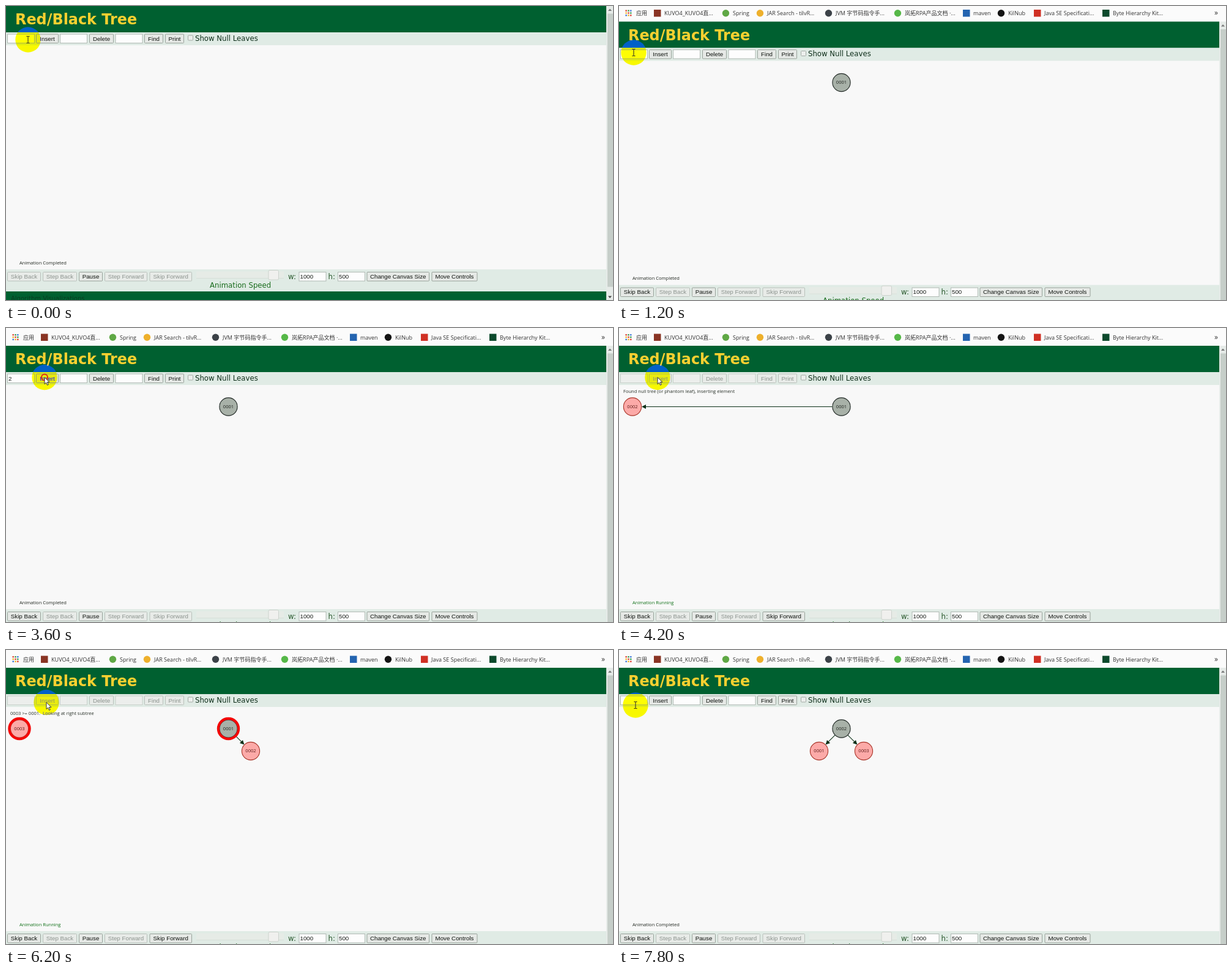
An HTML page for the animation above (8 s loop, 992 by 480 pixels).

```html
<!DOCTYPE html>
<html lang="en">
<head>
<meta charset="utf-8">
<title>Red/Black Tree</title>
<style>
html, body { margin: 0; width: 100%; height: 100%; overflow: hidden; background: #f8f8f8; }
svg { display: block; width: 992px; height: 480px; isolation: isolate; }
text { white-space: pre; }
.page { font-family: "DejaVu Sans", sans-serif; font-size: 11.72px; }
.form { font-family: "Liberation Sans", sans-serif; font-size: 9.76px; }
.note { font-family: "Open Sans", sans-serif; font-size: 7.55px; }
.mark { font-family: "Open Sans", "Noto Sans CJK SC", "Noto Sans CJK", sans-serif; font-size: 9.05px; }
.glow { mix-blend-mode: difference; }
</style>
</head>
<body>
<svg id="stage" viewBox="0 0 992 480"></svg>
<script>
const LOOP = 8000, STEP = 200;
const stage = document.getElementById('stage');

// Last value whose start time has passed
const at = (keys, t) => keys.reduce((v, k) => (t >= k[0] ? k[1] : v), '');
const within = (spans, t) => spans.some(([a, b]) => t >= a && t < b);

// Linear path through [time, x, y] points
function along(keys, t) {
  const i = keys.findIndex(k => k[0] > t);
  if (i < 0) return keys[keys.length - 1].slice(1);
  if (i === 0) return keys[0].slice(1);
  const [a, b] = [keys[i - 1], keys[i]], u = (t - a[0]) / (b[0] - a[0]);
  return [1, 2].map(n => a[n] + (b[n] - a[n]) * u);
}

const rect = (x, y, w, h, fill, more = '') =>
  `<rect x="${x}" y="${y}" width="${w}" height="${h}" fill="${fill}" ${more}/>`;
const disc = (x, y, r, fill, more = '') =>
  `<circle cx="${x}" cy="${y}" r="${r}" fill="${fill}" ${more}/>`;
const path = (d, fill, more = '') => `<path d="${d}" fill="${fill}" ${more}/>`;
const label = (x, y, str, cls, fill, more = '') =>
  `<text x="${x}" y="${y}" class="${cls}" fill="${fill}" ${more}>` +
  `${str.replace(/</g, '&lt;').replace(/>/g, '&gt;')}</text>`;

function button(x, x2, y, str, on = true) {
  return rect(x + .5, y + .5, x2 - x - 1, 14.5, on ? '#e6e9e6' : '#e8ebe8',
      `rx="1" stroke="${on ? '#98a29a' : '#b8c0ba'}"`) +
    label((x + x2) / 2, y + 11, str, 'form', on ? '#101410' : '#8c938e', 'text-anchor="middle"');
}

function field(x, y, str = '', on = true, focus = false) {
  return rect(x + .5, y + .5, 44, 14.5, on ? '#fdfdfd' : '#eceeec',
      `stroke="${focus ? '#5a86d8' : on ? '#b0bab4' : '#c8d0ca'}" stroke-width="${focus ? 1.6 : 1}"`) +
    label(x + 2, y + 11, str, 'form', '#181c18');
}

const marks = [
  [74, 'KUVO4_KUVO4直...', '#8a3424', 'sq'],
  [186, 'Spring', '#5fa845'],
  [242, 'JAR Search - tilvR...', '#eeb02c'],
  [354, 'JVM 字节码指令手...', '#3c4248'],
  [467, '岚拓RPA产品文档 ·...', '#56b848'],
  [579, 'maven', '#2464b0', 'sq'],
  [636, 'KilNub', '#141414'],
  [695, 'Java SE Specificati...', '#d03024', 'sq'],
  [807, 'Byte Hierarchy Kit...', '#0c4a2c', 'sq'],
];

function bookmarks() {
  const tints = ['#e04434', '#3c9c50', '#3c78d8', '#f0b428'];
  let out = rect(0, -29, 992, 29, '#fbfbfb');
  for (let i = 0; i < 9; i++)
    out += rect(10.5 + i % 3 * 3.8, -19 + Math.floor(i / 3) * 3.8, 2.4, 2.4, tints[i % 4]);
  out += label(28, -10.3, '应用', 'mark', '#333');
  for (const [x, str, tint, sq] of marks)
    out += (sq ? rect(x - 17, -19.5, 11.5, 11.5, tint) : disc(x - 11.5, -13.8, 5.7, tint)) +
      label(x, -10.3, str, 'mark', '#333');
  return out + label(973, -10, '»', 'mark', '#333', 'style="font-size:12px"');
}

function scrollbar() {
  return rect(981, 0, 11, 500, '#e6ebe8') + rect(983, 12.5, 9, 446, '#c6cec9') +
    path('M984 8l3-3.5 3 3.5z', '#777') + path('M984 473.5l3 3.5 3-3.5z', '#444');
}

const nodes = {
  1: { from: 600, path: [[7200, 363.5, 99.5], [7600, 327, 136]], red: [[7400, LOOP]],
       ring: [[4000, 4200], [6200, 6400]] },
  2: { from: 3800, path: [[4200, 22, 99.5], [4600, 400, 136], [7200, 400, 136], [7600, 363.5, 99.5]],
       red: [[0, 7400]], ring: [[3800, 4200], [6400, 6600]] },
  3: { from: 6000, path: [[6600, 22, 99.5], [7000, 436.5, 172.5], [7200, 436.5, 172.5], [7600, 400, 136]],
       red: [[0, LOOP]], ring: [[6000, 6600]] },
};
const edges = [[1, 2, 4200, 7200], [2, 3, 6600, LOOP], [2, 1, 7200, LOOP]];

function edge(a, b) {
  const dx = b[0] - a[0], dy = b[1] - a[1], d = Math.hypot(dx, dy);
  if (d < 31) return '';
  const turn = Math.atan2(dy, dx) * 180 / Math.PI;
  return `<g transform="translate(${a}) rotate(${turn})">` +
    path(`M15 0H${d - 16}`, 'none', 'stroke="#0c3018" stroke-width="1.1"') +
    path(`M${d - 15} 0l-7-3.6v7.2z`, '#0c3018') + '</g>';
}

function tree(t) {
  let out = '';
  for (const [a, b, from, to] of edges)
    if (within([[from, to]], t)) out += edge(along(nodes[a].path, t), along(nodes[b].path, t));
  for (const [key, n] of Object.entries(nodes)) {
    if (t < n.from) continue;
    const [x, y] = along(n.path, t), red = within(n.red, t);
    out += disc(x, y, 14.6, red ? '#fcaaa8' : '#a8b1a8', `stroke="${red ? '#a83428' : '#202824'}" stroke-width="1.1"`);
    if (within(n.ring, t)) out += disc(x, y, 16.6, 'none', 'stroke="#f40808" stroke-width="4.2"');
    out += label(x, y + 2.4, '000' + key, 'note', red ? '#5c1a18' : '#20241f', 'text-anchor="middle"');
  }
  return out;
}

const typed = [[200, '1'], [600, ''], [2800, '2'], [3800, ''], [5400, '3'], [6000, '']];
const focused = [[200, 400], [2400, 3400], [5000, 5800]];
const busy = [[600, 1000], [3800, 4800], [6000, 7600]];
const look = (a, b) => `000${a} >= 000${b}.  Looking at right subtree`;
const found = 'Found null tree (or phantom leaf), inserting element';
const notes = [
  [600, 'Inserting 0001'], [1000, ''],
  [3800, 'Inserting 0002'], [4000, look(2, 1)], [4200, found], [4600, ''],
  [6000, 'Inserting 0003'], [6200, look(3, 1)], [6400, look(3, 2)], [6600, found],
  [7200, 'Single Rotate Left'], [7600, ''],
];

function page(t) {
  const run = within(busy, t), idle = !run, text = at(typed, t), focus = within(focused, t);
  const caret = focus ? rect(text ? 10 : 4.5, 48.5, 1, 10, '#203070') : '';
  return bookmarks() +
    rect(0, 0, 981, 43, '#006030') +
    label(15, 30.3, 'Red/Black Tree', 'page', '#f8d030', 'style="font-size:23.9px;font-weight:bold"') +
    rect(0, 43, 981, 21, '#e0ebe5') +
    field(2, 45.5, text, idle, focus) + caret + button(49, 86, 45.5, 'Insert', idle) +
    field(88, 45.5, '', idle) + button(136, 176, 45.5, 'Delete', idle) +
    field(178.5, 45.5, '', idle) + button(226, 257, 45.5, 'Find', idle) +
    button(260, 291, 45.5, 'Print', idle) +
    rect(297.5, 48, 8, 8, '#eceeec', 'rx="1" stroke="#a4aca6"') +
    label(309, 56.7, 'Show Null Leaves', 'page', '#10301c') +
    tree(t) +
    label(7, 76.6, at(notes, t), 'note', '#283028') +
    label(22, 421.8, run ? 'Animation Running' : 'Animation Completed', 'note', run ? '#107018' : '#20261f') +
    rect(0, 430, 981, 36, '#e0ebe5') +
    button(2, 57, 434, 'Skip Back', t >= 600) + button(60, 116, 434, 'Step Back', false) +
    button(119, 158, 434, 'Pause') + button(161, 231, 434, 'Step Forward', false) +
    button(234.5, 304, 434, 'Skip Forward', run) +
    rect(311, 433.5, 143, 11.5, '#e6ebe6') + path('M311 444.5H454', 'none', 'stroke="#d4dcd6" stroke-width=".8"') +
    rect(429, 431.5, 16.5, 15.5, '#f0f0ee', 'rx="2" stroke="#ccd2cc"') +
    label(461, 445.5, 'w:', 'page', '#28582c') + field(478.5, 434, '1000') +
    label(526.5, 445.5, 'h:', 'page', '#28582c') + field(542, 434, '500') +
    button(589.5, 692, 434, 'Change Canvas Size') + button(695.5, 770.5, 434, 'Move Controls') +
    label(333, 459.7, 'Animation Speed', 'page', '#186c1c') +
    rect(0, 466, 981, 40, '#006030') +
    label(8, 481, 'Algorithm Visualizations', 'page', '#083c20', 'style="font-size:10px"') +
    scrollbar();
}

// Floating input-method bar
function inputBar() {
  return rect(878.5, 170.5, 109, 15.5, '#f2f6fa', 'rx="2" stroke="#8ea8c4" stroke-width="1.4"') +
    rect(885, 173.5, 10, 10, '#4878ac') + label(900, 181.8, '英', 'mark', '#304868') +
    path('M921 174a5 5 0 1 1-6 7q5 0 6-7z', '#405a80') +
    disc(931, 178, .8, '#a8b8c8') + disc(936, 180, .8, '#a8b8c8') +
    rect(944, 175.5, 10, 6, '#88a4c4', 'rx="1" stroke="#405a80"') +
    disc(963.5, 175.5, 2.2, '#405a80') + path('M959.5 183v-3q4-4 8 0v3z', '#405a80') +
    path('M973.5 182.5l5-5', 'none', 'stroke="#405a80" stroke-width="2"') +
    path('M981 174.5a2.6 2.6 0 1 0 .8 3', 'none', 'stroke="#405a80" stroke-width="1.6"');
}

const pointerPath = [
  [0, 36, 55], [400, 66, 66], [800, 66, 78], [1200, 24, 76], [1800, 19, 82], [2800, 19, 82],
  [3200, 63, 82], [3600, 63, 80.5], [4200, 63, 80.5], [4800, 19, 82], [5400, 19, 82],
  [5800, 66, 85.5], [6800, 66, 85.5], [7400, 34, 89], [7800, 27, 90],
];
const clicks = [400, 2400, 3600, 5000, 5800];

function pointer(t) {
  const [x, y] = along(pointerPath, t);
  const shape = x > 47
    ? path('M0 0v11l2.6-2.4 1.9 4.2 1.8-.8-1.9-4.1h3.5z', '#fff', 'stroke="#222" stroke-width=".9"')
    : path('M-2.5-5.5H-.5L0-5 .5-5.5H2.5M0-5V5M-2.5 5.5H-.5L0 5 .5 5.5H2.5', 'none', 'stroke="#222"');
  const ring = clicks.includes(t) ? disc(0, 0, 5, 'none', 'stroke="#e02818" stroke-width="2"') : '';
  return disc(x, y, 20.7, '#0000f8', 'class="glow"') +
    `<g transform="translate(${x} ${y})">${ring}${shape}</g>`;
}

function draw(t) {
  const left = Math.max(0, 1 - t / 1840);
  const pan = 29 * (1 - left * left);
  stage.innerHTML = rect(0, 0, 992, 480, '#f8f8f8') +
    `<g transform="translate(0 ${pan.toFixed(2)})">${page(t)}</g>` +
    (within([[2600, 3400], [4800, 5600]], t) ? inputBar() : '') + pointer(t);
}

let shown = -1;
const start = performance.now();
function tick() {
  const t = Math.floor((performance.now() - start) % LOOP / STEP) * STEP;
  if (t !== shown) draw(shown = t);
  requestAnimationFrame(tick);
}
tick();
</script>
</body>
</html>
```
